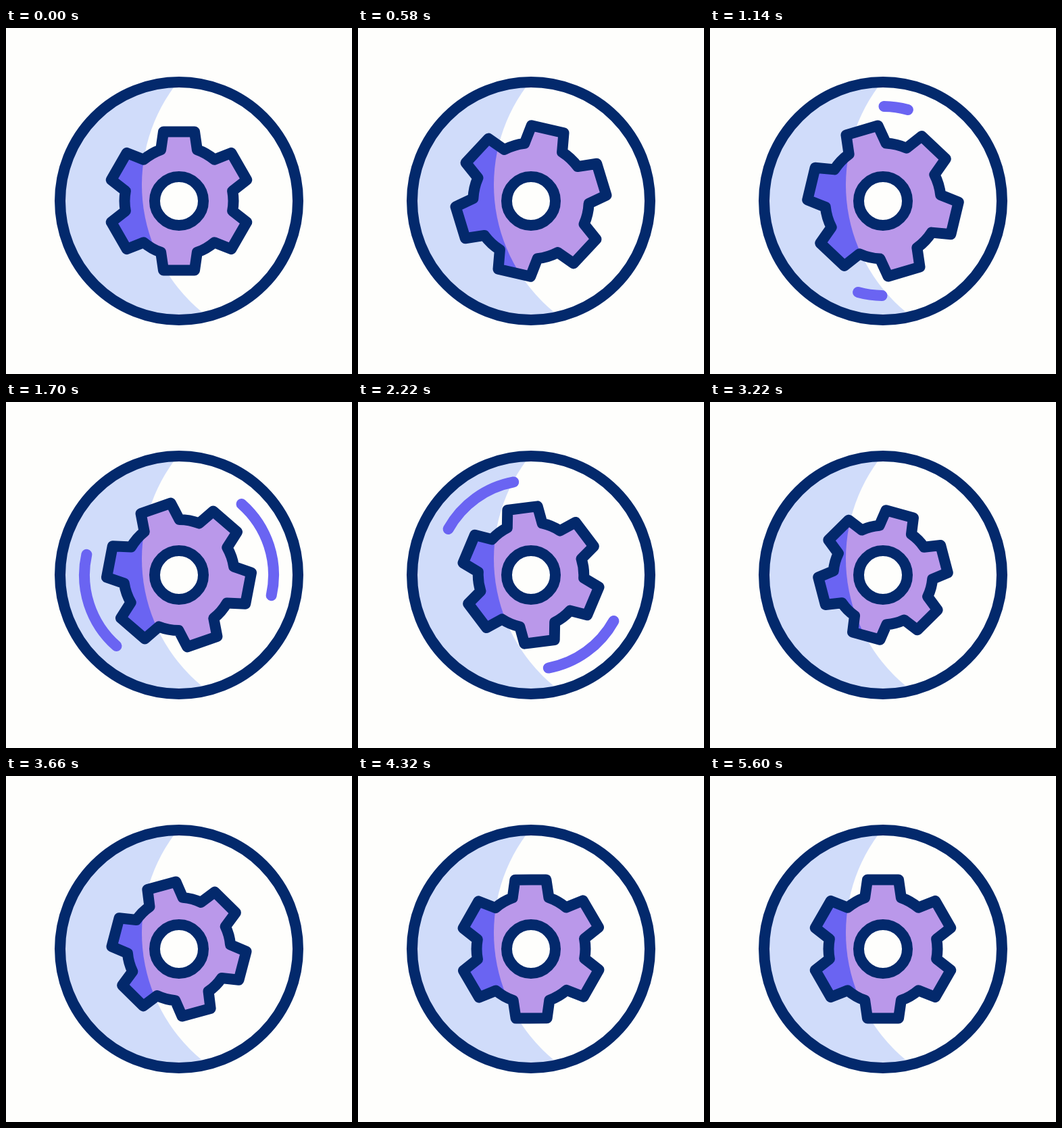
Write an HTML page that moves like this. It is 512x512 px and loops after 5620 ms.

```html
<!DOCTYPE html>
<html lang="en">
<head>
<meta charset="utf-8">
<title>Spinning gear</title>
<style>
  html, body { margin: 0; width: 100%; height: 100%; overflow: hidden; background: #fefefc; }
  svg { display: block; width: 100%; height: 100%; }
  .line { fill: none; stroke-width: 16; stroke-linecap: round; stroke-linejoin: round; }
  .navy { stroke: #03296c; }
  .violet { stroke: #6a64f2; }
  .paper { fill: #fefefc; }
</style>
</head>
<body>
<svg viewBox="0 0 512 512">
  <defs>
    <clipPath id="disc"><circle cx="256" cy="256" r="176"/></clipPath>
    <clipPath id="lit"><circle cx="445" cy="232" r="244"/></clipPath>
    <path id="gear"/>
  </defs>
  <circle cx="256" cy="256" r="176" fill="#d0dcfa"/>
  <g clip-path="url(#disc)"><circle class="paper" cx="445" cy="232" r="244"/></g>
  <path id="trailRight" class="line violet"/>
  <path id="trailLeft" class="line violet"/>
  <use href="#gear" fill="#6a64f2"/>
  <g clip-path="url(#lit)"><use href="#gear" fill="#ba98ea"/></g>
  <use href="#gear" class="line navy"/>
  <circle class="paper" cx="256" cy="256" r="36"/>
  <circle class="line navy" cx="256" cy="256" r="36"/>
  <circle class="line navy" cx="256" cy="256" r="176"/>
</svg>
<script>
const LOOP = 5620;
const CENTER = 256;
const gear = document.getElementById('gear');
const trails = [
  [document.getElementById('trailRight'), 0],
  [document.getElementById('trailLeft'), 180]
];

const progress = (n, from, to) => Math.min(1, Math.max(0, (n - from) / (to - from)));
const smooth = t => t * t * (3 - 2 * t);
const ease = (n, from, to) => smooth(progress(n, from, to));

// Same curve as CSS cubic-bezier(), solved by bisection
function cubicBezier(x1, y1, x2, y2) {
  const curve = (a, b, s) => 3 * a * s * (1 - s) ** 2 + 3 * b * s * s * (1 - s) + s ** 3;
  return t => {
    if (t <= 0 || t >= 1) return t;
    let low = 0, high = 1;
    for (let i = 0; i < 24; i++) {
      const s = (low + high) / 2;
      if (curve(x1, x2, s) < t) low = s; else high = s;
    }
    return curve(y1, y2, low);
  };
}
const spin = cubicBezier(0.565, 0.06, 0.485, 0.96);

// Angles are in degrees, clockwise from the top
function polar(radius, angle) {
  const a = angle * Math.PI / 180;
  const x = CENTER + radius * Math.sin(a);
  const y = CENTER - radius * Math.cos(a);
  return x.toFixed(2) + ' ' + y.toFixed(2);
}

function gearPath(angle, scale) {
  const root = 80.5 * scale, tip = 105.05 * scale;
  let d = '';
  for (let i = 0; i < 6; i++) {
    const a = angle + i * 60;
    d += i ? `A${root} ${root} 0 0 1 ` : 'M';
    d += `${polar(root, a - 19.5)}L${polar(tip, a - 12.65)}`;
    d += `L${polar(tip, a + 12.65)}L${polar(root, a + 19.5)}`;
  }
  return `${d}A${root} ${root} 0 0 1 ${polar(root, angle - 19.5)}Z`;
}

function gearScale(n) {
  if (n < 17) return 1 + 0.075 * ease(n, 0, 17);
  if (n < 68) return 1.075 - 0.163 * ease(n, 17, 68);
  return 0.912 + 0.088 * ease(n, 68, 93);
}

function trailPath(n, offset) {
  const tail = ease(n, 26.7, 60);
  const head = ease(n, 19.3, 51.7);
  if (head <= tail) return '';
  const at = p => polar(140, offset + 0.6 + 179 * p);
  return `M${at(tail)}A140 140 0 0 1 ${at(head)}`;
}

// Poses are held for 20, 100 and 20 ms in turn
function poseAt(time) {
  const rest = time % 140;
  return 3 * Math.floor(time / 140) + (rest >= 20) + (rest >= 120);
}

function draw(time) {
  const n = poseAt(time);
  gear.setAttribute('d', gearPath(360 * spin(progress(n, 0, 93)), gearScale(n)));
  for (const [path, offset] of trails) path.setAttribute('d', trailPath(n, offset));
}

const start = performance.now();
function tick() {
  draw((performance.now() - start) % LOOP);
  requestAnimationFrame(tick);
}
tick();
</script>
</body>
</html>
```
